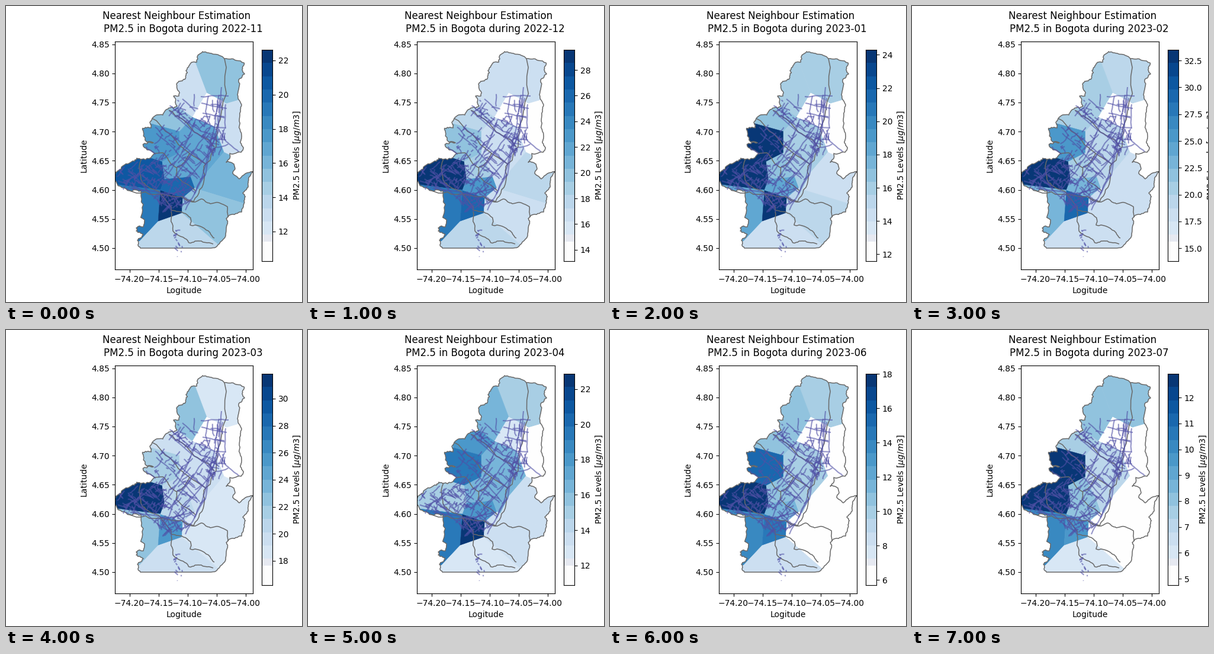
Write a matplotlib script that moves like this. It is 500x500 px and loops after 8000 ms.

```python
import numpy as np
import matplotlib.pyplot as plt
from matplotlib.animation import FuncAnimation
from matplotlib.collections import LineCollection, PolyCollection
from matplotlib.colors import ListedColormap
from matplotlib.patches import PathPatch
from matplotlib.path import Path

SIZE = 500
BANDS = 16
GREY, ROAD = "#696969", "#5050a6"
rng = np.random.default_rng(7)

# City border in stage pixels, clockwise from the northern tip.
EAST = [
    (324, 84), (332, 77), (347, 80), (362, 84), (369, 89), (389, 92), (402, 96),
    (399, 107), (403, 115), (393, 125), (391, 150), (398, 167), (395, 184),
    (396, 212), (398, 220), (396, 231), (401, 239), (397, 247), (378, 249),
    (372, 264), (385, 267), (383, 283), (394, 292), (418, 280),
]
SOUTH = [
    (410, 290), (409, 306), (400, 316), (402, 329), (398, 348), (378, 353),
    (372, 359), (374, 368), (367, 394), (346, 409),
]
WEST = [
    (227, 409), (222, 396), (232, 386), (220, 380), (220, 375), (232, 373),
    (230, 350), (228, 312), (203, 309), (184, 290), (185, 281), (195, 272),
    (217, 262), (221, 257), (229, 259), (251, 249),
]
NORTHWEST = [
    (232, 237), (234, 232), (249, 231), (232, 212), (236, 205), (245, 206),
    (243, 197), (247, 190), (265, 184), (277, 172), (289, 169), (283, 152),
    (292, 152), (288, 132), (292, 127), (302, 124), (304, 109), (312, 97),
    (322, 95),
]

DISTRICTS = [
    [(369, 89), (356, 205), (338, 266), (335, 290), (317, 330)],
    [(275, 176), (297, 190), (318, 213), (352, 238)],
    [(247, 190), (291, 234), (310, 249), (338, 268)],
    [(251, 249), (265, 248), (280, 268), (288, 273), (287, 286), (320, 312)],
    [(288, 273), (310, 249)],
    [(228, 259), (225, 274), (230, 298), (258, 313), (279, 345)],
    [(206, 311), (265, 318), (297, 322), (318, 331)],
    [(279, 347), (282, 380), (300, 391), (309, 400), (330, 397), (350, 402)],
    [(279, 345), (297, 348), (312, 358), (311, 370), (342, 380), (352, 392)],
    [(297, 322), (318, 331), (330, 326), (345, 334), (374, 339), (375, 357)],
]

# Shared corners of the nearest-station cells, and each cell by its corners.
CORNERS = {
    "a": (307, 62), "b": (339, 147), "c": (372, 165), "d": (410, 154),
    "e": (410, 62), "f": (270, 100), "g": (275, 160), "h": (315, 188),
    "i": (293, 212), "j": (246, 199), "k": (235, 180), "l": (366, 161),
    "m": (352, 204), "n": (420, 272), "o": (368, 247), "p": (225, 193),
    "q": (293, 248), "r": (264, 263), "s": (225, 251), "t": (268, 292),
    "u": (261, 311), "v": (180, 301), "w": (180, 250), "x": (257, 364),
    "y": (226, 397), "z": (200, 400), "A": (299, 324), "B": (297, 350),
    "C": (312, 288), "D": (319, 307), "E": (325, 310), "F": (340, 280),
    "G": (420, 339), "H": (420, 410), "I": (215, 412), "J": (365, 409),
}
CELLS = ["ablcde", "abhgf", "ghijk", "blmh", "lcdnom", "pjiqrs", "srtuvw",
         "vuxyz", "uABx", "tCDAu", "rqCt", "ihmoFEDCq", "onGEF", "DEGHJBA",
         "xBJIy"]

# Month, colour bar range, colour band of every cell.
MONTHS = [
    ("2022-11", 10.27, 22.62, [6, 3, 6, 0, 3, 9, 13, 11, 15, 12, 8, 8, 7, 6, 4]),
    ("2022-12", 13.12, 29.57, [3, 3, 4, 0, 0, 6, 15, 11, 12, 9, 5, 3, 4, 3, 4]),
    ("2023-01", 11.59, 24.30, [5, 5, 6, 0, 0, 15, 15, 8, 15, 8, 6, 5, 3, 4, 3]),
    ("2023-02", 13.80, 33.50, [4, 5, 5, 0, 0, 9, 15, 7, 12, 7, 5, 4, 3, 3, 3]),
    ("2023-03", 16.20, 31.84, [2, 6, 3, 0, 0, 5, 15, 6, 9, 4, 4, 3, 2, 2, 3]),
    ("2023-04", 10.88, 22.86, [5, 7, 9, 2, 0, 11, 5, 11, 15, 9, 7, 7, 3, 3, 2]),
    ("2023-06", 5.70, 18.00, [5, 6, 6, 0, 0, 12, 15, 10, 11, 7, 6, 5, 0, 0, 3]),
    ("2023-07", 4.75, 12.92, [6, 6, 5, 0, 0, 15, 15, 10, 9, 6, 6, 4, 0, 0, 2]),
]

MAIN_ROADS = [
    [(364, 137), (357, 205), (337, 285), (303, 345)],
    [(360, 150), (352, 205), (331, 290), (318, 318)],
    [(357, 205), (372, 229), (393, 246)],
    [(329, 153), (376, 152)],
    [(330, 164), (373, 173)],
    [(332, 181), (369, 187)],
    [(320, 191), (352, 205), (371, 206)],
    [(371, 166), (371, 207)],
    [(342, 152), (337, 178), (345, 200)],
    [(298, 157), (319, 178)],
    [(276, 177), (314, 210), (352, 238)],
    [(288, 184), (330, 212), (354, 218)],
    [(262, 204), (338, 268)],
    [(254, 215), (298, 258), (327, 290)],
    [(320, 192), (296, 250), (250, 312)],
    [(345, 206), (295, 275), (262, 335)],
    [(352, 240), (280, 322)],
    [(210, 308), (270, 318), (318, 308)],
    [(198, 297), (270, 256)],
    [(206, 275), (280, 342)],
]

# Blocks of minor streets: centre, half sizes, tilt, street angle, count.
BLOCKS = [
    (312, 250, 64, 35, 110, 42, 88),
    (266, 232, 20, 24, 42, 42, 20),
    (232, 285, 38, 22, -10, 35, 75),
    (280, 327, 26, 14, -15, 55, 38),
    (343, 180, 28, 24, 5, 8, 13),
    (357, 228, 20, 10, 105, 15, 20),
    (292, 175, 13, 12, 40, 40, 14),
    (291, 401, 26, 6, 80, 60, 14),
]


def rough(points, amp, depth):
    """Subdivide a line and push the midpoints sideways at random."""
    pts = np.array(points, float)
    for _ in range(depth):
        step = np.diff(pts, axis=0)
        side = np.column_stack([-step[:, 1], step[:, 0]])
        mid = pts[:-1] + step / 2 + side * rng.normal(0, amp, (len(step), 1))
        out = np.empty((2 * len(pts) - 1, 2))
        out[::2], out[1::2] = pts, mid
        pts = out
    return pts


def heading(degrees):
    turn = np.radians(degrees)
    return np.array([np.cos(turn), np.sin(turn)])


def streets(x, y, along, across, tilt, angle, count):
    """Random short streets along two crossing directions in a tilted block."""
    reach = 11 if y < 360 else 4
    lines = []
    for _ in range(count):
        mid = (np.array([x, y]) + rng.uniform(-along, along) * heading(tilt)
               + rng.uniform(-across, across) * heading(tilt + 90))
        way = heading(angle + 90 * rng.integers(2) + rng.normal(0, 10))
        half = rng.uniform(0.1, 1) * reach * way
        lines.append(rough([mid - half, mid + half], 0.07, 2))
    return lines


def pixel_axes(left, top, right, bottom):
    return fig.add_axes([left / SIZE, 1 - bottom / SIZE,
                         (right - left) / SIZE, (bottom - top) / SIZE])


blues = [plt.get_cmap("Blues")((k + 0.5) / BANDS) for k in range(BANDS)]
blues[0] = blues[1] = (0.996, 0.996, 0.996, 1)
bar_colors = [c for c in blues for _ in range(2)]
bar_colors[3] = (0.902, 0.914, 0.949, 1)

fig = plt.figure(figsize=(5, 5), dpi=100, facecolor="white")
ax = pixel_axes(184.4, 60, 417.2, 445)
ax.set_xlim(184.4, 417.2)
ax.set_ylim(445, 60)
ax.set_xticks([208.5 + 49 * i for i in range(5)],
              [f"\u2212{74.2 - 0.05 * i:.2f}" for i in range(5)])
ax.set_yticks([409 - 49.2 * i for i in range(8)],
              [f"{4.5 + 0.05 * i:.2f}" for i in range(8)])
ax.set_xlabel("Logitude")
ax.set_ylabel("Latitude")

# The southern edge stays a straight line.
border = np.vstack([
    rough(EAST + SOUTH, 0.1, 3),
    rough(WEST + NORTHWEST + EAST[:1], 0.15, 3),
])
city = PathPatch(Path(border), transform=ax.transData)

cells = PolyCollection([[CORNERS[c] for c in cell] for cell in CELLS],
                       linewidths=0.4)
ax.add_collection(cells)
cells.set_clip_path(city)

lines = [border] + [rough(d, 0.07, 3) for d in DISTRICTS]
ax.add_collection(LineCollection(lines, colors=GREY, linewidths=1.1, zorder=2))

minor = [line for block in BLOCKS for line in streets(*block)]
main = [rough(r, 0.025, 3) for r in MAIN_ROADS]
ax.add_collection(LineCollection(main + minor, colors=ROAD, linewidths=1.5,
                                 alpha=0.6, zorder=3))

cax = pixel_axes(432, 74, 450, 431)
bar = cax.imshow(np.arange(2 * BANDS)[:, None], cmap=ListedColormap(bar_colors),
                 origin="lower", aspect="auto", interpolation="nearest")
cax.set_xticks([])
cax.yaxis.tick_right()
cax.yaxis.set_label_position("right")
cax.set_ylabel(r"PM2.5 Levels [$\mu g/m3$]")

fig.text(163 / SIZE, 1 - 22 / SIZE, "Nearest Neighbour Estimation",
         fontsize=12, va="baseline")
title = fig.text(165 / SIZE, 1 - 44 / SIZE, "", fontsize=12, va="baseline")


def update(i):
    month, low, high, levels = MONTHS[i]
    title.set_text(f"PM2.5 in Bogota during {month}")
    colors = [blues[k] for k in levels]
    cells.set_facecolor(colors)
    cells.set_edgecolor(colors)
    bar.set_extent((0, 1, low, high))
    cax.set_xlim(0, 1)
    cax.set_ylim(low, high)
    return title, cells, bar


anim = FuncAnimation(fig, update, frames=len(MONTHS), interval=1000,
                     repeat=True, repeat_delay=0, blit=False)
plt.show()
```
